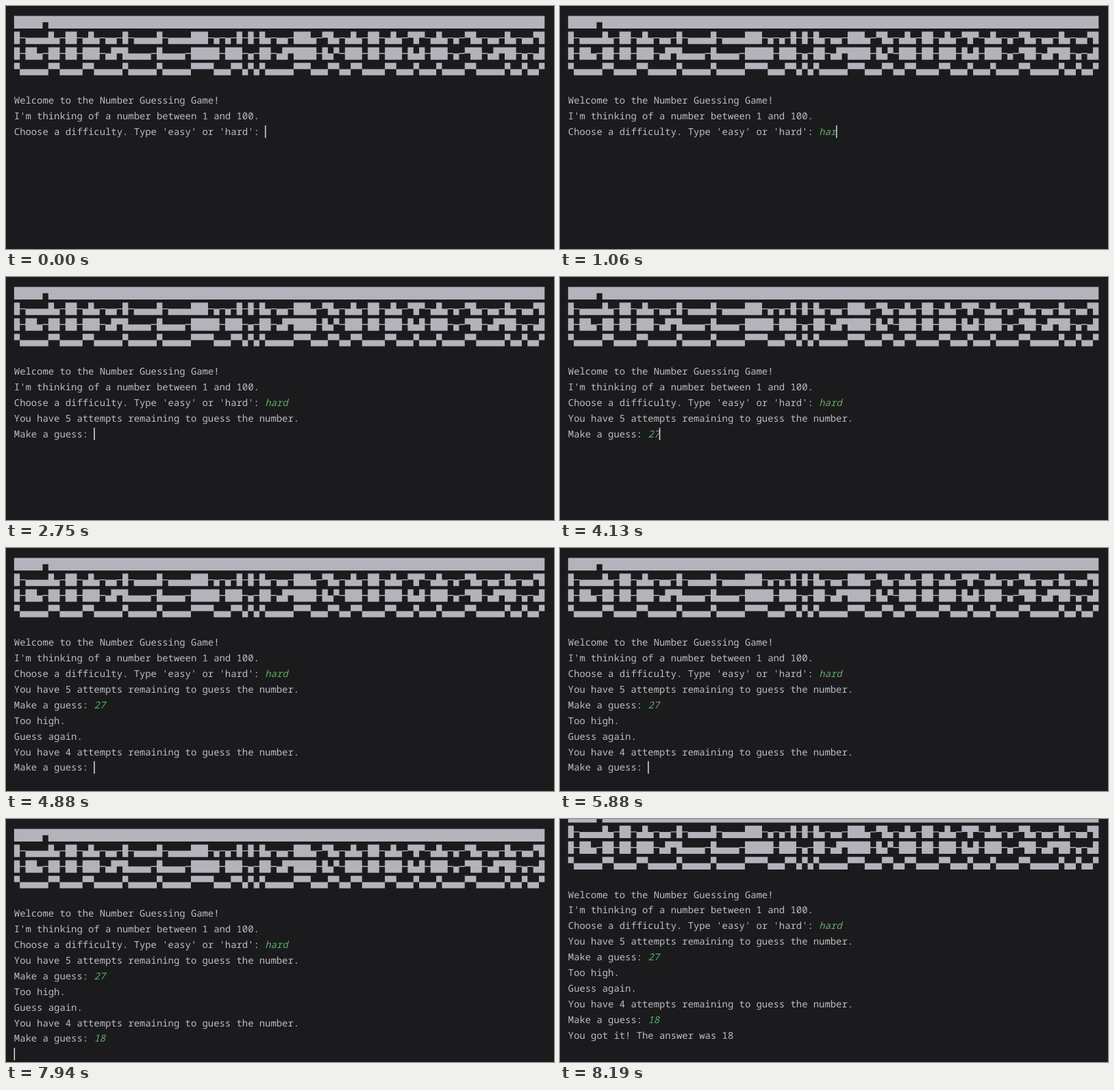
Animation, 800 px wide and 356 px high, one loop 10 s. Source, as an HTML page with a canvas:

```html
<!DOCTYPE html>
<html lang="en">
<head>
<meta charset="utf-8">
<title>Number guessing game</title>
<style>
html, body { margin: 0; width: 100%; height: 100%; overflow: hidden; background: #1b1b1d; }
canvas { display: block; width: 800px; height: 356px; }
</style>
</head>
<body>
<canvas id="stage"></canvas>
<script>
const LOOP = 10000, W = 800, H = 356;
const LEFT = 11.8, CELL = 8.328, LINE = 22.9, BASE = 28.7;
const ASCENT = 14.1, DESCENT = 4.2, MIDDLE = 5;
const SCROLL_AT = 8190, SCROLL_BY = 27.7;
const BG = '#1b1b1d', INK = '#bcbec4', BLOCK = '#b3b3bb', GREEN = '#5fad65', CARET = '#ced0d6';
const FONT = '13.88px "Noto Sans Mono", "DejaVu Sans Mono", monospace';

// Inner columns of each banner letter; neighbours share a solid border column.
const LETTERS = {
  G: ['─▄▄▄▄', '─██▄─', '▄▄▄▄▄'],
  U: ['▄─██─▄', '█─██─█', '▀▄▄▄▄▀'],
  E: ['▄─▄▄─', '█─▄█▀', '▄▄▄▄▄'],
  S: ['─▄▄▄▄', '▄▄▄▄─', '▄▄▄▄▄'],
  T: ['─▄─▄─', '██─██', '▀▄▄▄▀'],
  H: ['─█─', '─▄─', '▄▀▄'],
  N: ['▄─▀█▄─▄', '█─█▄▀─█', '▄▄▄▀▀▄▄'],
  M: ['▄─▀█▀─▄', '█─█▄█─█', '▄▄▄▀▄▄▄'],
  B: ['▄─▄─▀', '█─▄─▀', '▄▄▄▄▀'],
  R: ['▄─▄▄▀', '█─▄─▄', '▄▄▀▄▄'],
  ' ': ['█', '█', '▀']
};

const PROMPT = 'Make a guess: ';
const attempts = n => `You have ${n} attempts remaining to guess the number.`;

// [row, time shown, text, typed reply, key times]
const TEXT = [
  [5, 0, 'Welcome to the Number Guessing Game!'],
  [6, 0, "I'm thinking of a number between 1 and 100."],
  [7, 0, "Choose a difficulty. Type 'easy' or 'hard': ", 'hard', [60, 630, 880, 1190]],
  [8, 1880, attempts(5)],
  [9, 1880, PROMPT, '27', [3750, 4130]],
  [10, 4880, 'Too high.'],
  [11, 4880, 'Guess again.'],
  [12, 4880, attempts(4)],
  [13, 4880, PROMPT, '18', [6810, 7310]],
  [14, SCROLL_AT, 'You got it! The answer was 18']
];

// [time, row, column]; without a row the caret is hidden
const CARETS = [
  [0, 7, 44], [60, 7, 45], [560], [630, 7, 46], [880, 7, 47], [1190, 7, 48],
  [1750, 8, 0], [1880, 9, 14], [2250], [2750, 9, 14], [3380],
  [3750, 9, 15], [4130, 9, 16], [4880, 13, 14], [5380], [5880, 13, 14], [6380],
  [6810, 13, 15], [7310, 13, 16], [7880, 14, 0], [SCROLL_AT]
];

const canvas = document.getElementById('stage');
const ctx = canvas.getContext('2d');
const dpr = window.devicePixelRatio || 1;
canvas.width = W * dpr;
canvas.height = H * dpr;

const xAt = col => LEFT + col * CELL;
const yAt = row => BASE + row * LINE;

function bannerRows(word) {
  const rows = ['█████▀' + '█'.repeat(87)];
  ['█', '█', '▀'].forEach((edge, i) =>
    rows.push(edge + [...word].map(c => LETTERS[c][i] + edge).join('')));
  return rows;
}

function bannerPath(rows) {
  const path = new Path2D();
  const spans = {
    '█': [-ASCENT, DESCENT],
    '▀': [-ASCENT, -MIDDLE],
    '▄': [-MIDDLE, DESCENT],
    '─': [-MIDDLE - 0.7, -MIDDLE + 0.7]
  };
  rows.forEach((line, row) => {
    for (let a = 0, b; a < line.length; a = b) {
      for (b = a + 1; line[b] === line[a];) b++;
      const [top, bottom] = spans[line[a]];
      path.rect(xAt(a), yAt(row) + top, (b - a) * CELL, bottom - top);
    }
  });
  return path;
}

const banner = bannerPath(bannerRows('GUESS THE NUMBER'));

function write(text, row, col, color, style = '') {
  ctx.font = style + FONT;
  ctx.fillStyle = color;
  ctx.fillText(text, xAt(col), yAt(row));
}

function draw(t) {
  ctx.setTransform(dpr, 0, 0, dpr, 0, 0);
  ctx.fillStyle = BG;
  ctx.fillRect(0, 0, W, H);
  if (t >= SCROLL_AT) ctx.translate(0, -SCROLL_BY);
  ctx.textRendering = 'geometricPrecision';

  ctx.fillStyle = BLOCK;
  ctx.fill(banner);

  for (const [row, from, text, reply, keys] of TEXT) {
    if (t < from) continue;
    write(text, row, 0, INK);
    if (!reply) continue;
    const typed = keys.filter(k => t >= k).length;
    write(reply.slice(0, typed), row, text.length, GREEN, 'italic ');
  }

  const [, row, col] = CARETS.filter(c => t >= c[0]).pop();
  if (row !== undefined) {
    ctx.fillStyle = CARET;
    ctx.fillRect(xAt(col) - 0.3, yAt(row) - ASCENT, 1.6, ASCENT + DESCENT);
  }
}

const start = performance.now();
function tick() {
  draw((performance.now() - start) % LOOP);
  requestAnimationFrame(tick);
}
tick();
</script>
</body>
</html>
```
